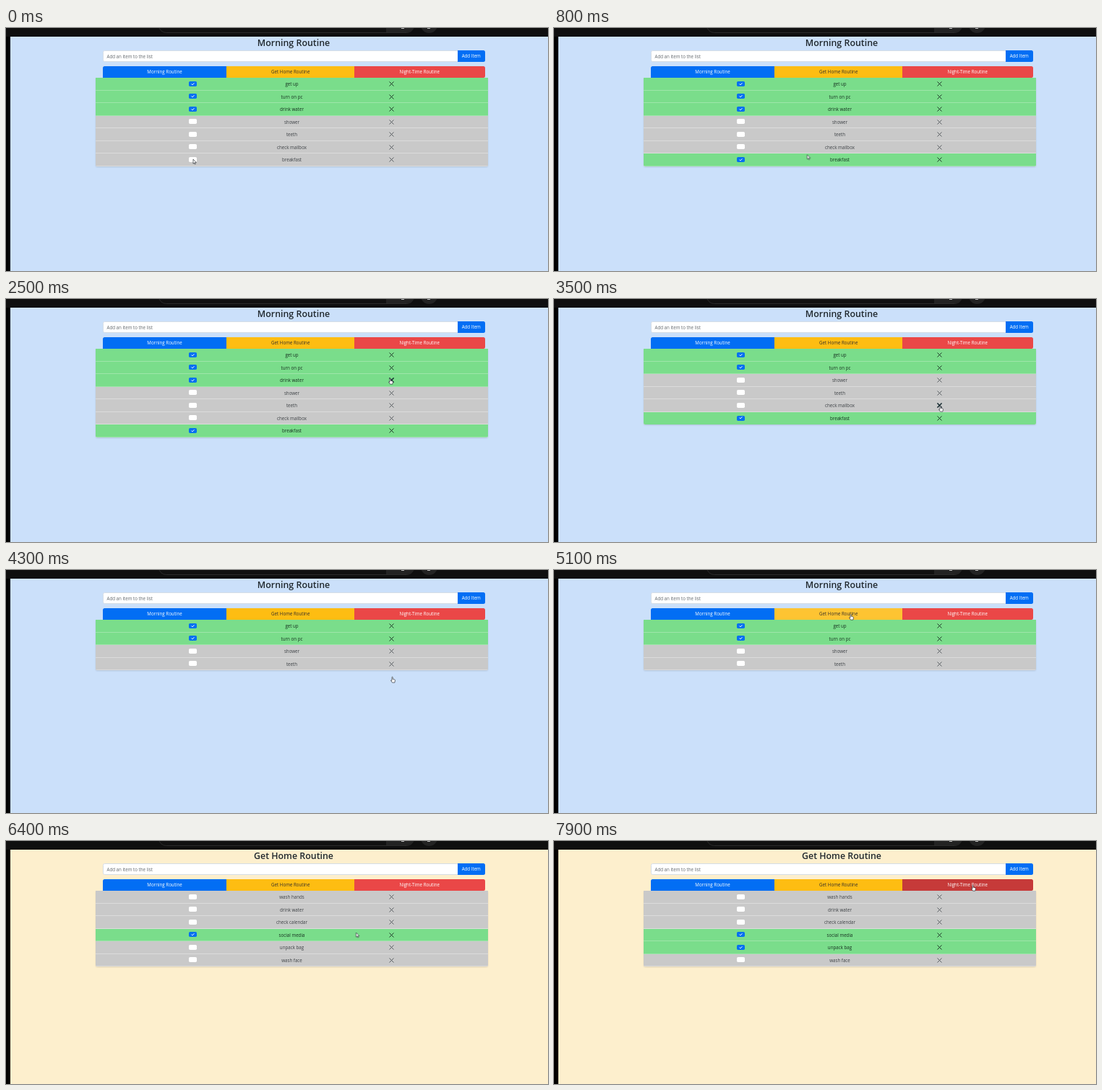
An HTML page that plays this animation: 750x337 px, repeating every 8 s.

```html
<!DOCTYPE html>
<html lang="en">
<head>
<meta charset="utf-8">
<title>Routine checklist</title>
<style>
  html, body { margin: 0; width: 100%; height: 100%; overflow: hidden; background: #000; }
  #stage {
    position: absolute; left: 0; top: 0; width: 750px; height: 337px; overflow: hidden;
    background: #000; color: #20282e;
    font: 6.2px/15px "Open Sans", "Noto Sans", sans-serif;
  }
  #stage div, #stage svg { position: absolute; box-sizing: border-box; }

  /* browser strip */
  .strip { left: 0; top: 0; width: 750px; height: 12px; background: #0f0f0f; overflow: hidden; }
  .search { left: 211px; top: -14px; width: 354px; height: 21px; border: 1px solid #2b2b2b; border-radius: 11px; background: #111; overflow: hidden; }
  .search div { right: 0; top: 0; width: 38px; height: 20px; background: #232323; }
  .round { left: 574px; top: -15px; width: 23px; height: 22px; border-radius: 50%; background: #232323; }
  .dash { top: -1px; width: 4px; height: 2px; background: #bbb; }

  /* pages */
  .page { left: 6px; top: 12px; width: 744px; height: 325px; }
  .morning { background: #cbe0fa; }
  .home { background: #fdefcd; animation: open 8s infinite; }
  .title { left: 0; top: 0; width: 784px; font-size: 12.4px; font-weight: 600; line-height: 17px; text-align: center; }
  .list { left: 118px; top: 57px; width: 543px; border-radius: 0 0 2.5px 2.5px; overflow: hidden; box-shadow: 0 1px 2px #0002; }
  #stage .row { position: relative; height: 17.5px; overflow: hidden; background: #c9c9c9; }
  .face { inset: 0; height: 17.5px; text-align: center; line-height: 18.4px; color: #3e4246; box-shadow: inset 0 -.7px #e3e3e3; }
  .on { background: #7add8b; color: #163020; box-shadow: inset 0 -.7px #a9e9b4; opacity: 0; }
  .done .on { opacity: 1; }
  .box { left: 129px; top: 4.5px; width: 11px; height: 7px; border-radius: 1.8px; background: #fff; }
  .on .box { background: #0570f0; }
  .box svg { left: 3px; top: 1px; width: 5px; height: 5px; }
  .face > svg { left: 406px; top: 5px; width: 7px; height: 7px; }
  svg { overflow: visible; fill: none; stroke: #5b6064; }
  .on svg { stroke: #20382a; }
  .on .box svg { stroke: #fff; }

  /* form and tabs */
  .field { left: 133.5px; top: 31px; width: 492px; height: 15.5px; padding-left: 5px; border-radius: 2.5px 0 0 2.5px; background: #fff; color: #63696e; border: .5px solid #d5dde6; }
  .btn { height: 15.5px; text-align: center; color: #fff; background: #026ef4; }
  .add { left: 625px; top: 31px; width: 37.5px; border-radius: 0 2.5px 2.5px 0; }
  .tab { top: 53px; height: 16px; line-height: 16px; }
  .t1 { left: 133.5px; width: 172px; border-radius: 2.5px 0 0 0; }
  .t2 { left: 305px; width: 177.5px; color: #33302a; background: #febd12; animation: hover-gold 8s infinite; }
  .t3 { left: 482px; width: 180.5px; border-radius: 0 2.5px 2.5px 0; background: #ea4747; animation: hover-red 8s infinite; }

  /* pointer */
  .pointer { left: 0; top: 0; width: 0; height: 0; animation: travel 8s ease-in-out infinite; }
  .pointer svg { left: 0; top: 0; width: 10px; height: 10px; }
  .pointer path { fill: #fff; stroke: #30343a; stroke-width: .7; stroke-linejoin: round; }
  .arrow { animation: arrow 8s step-end infinite; }
  .hand { animation: hand 8s step-end infinite; }
  #stage .hot { left: 530px; width: 7px; height: 7px; stroke: #152a30; stroke-width: 1.5; opacity: 0; }
  .hot.a { top: 161px; animation: hot-a 8s step-end infinite; }
  .hot.b { top: 109px; animation: hot-b 8s step-end infinite; }
  .hot.c { top: 144px; animation: hot-c 8s step-end infinite; }

  /* removed rows and ticked boxes */
  .gone-a { animation: gone-a 8s step-end infinite; }
  .gone-b { animation: gone-b 8s step-end infinite; }
  .gone-c { animation: gone-c 8s step-end infinite; }
  .tick-a .on { animation: tick-a 8s infinite; }
  .tick-b .on { animation: tick-b 8s infinite; }
  .tick-c .on { animation: tick-c 8s infinite; }

  @keyframes gone-a { 0% { height: 17.5px } 33.7%, 100% { height: 0 } }
  @keyframes gone-b { 0% { height: 17.5px } 46.2%, 100% { height: 0 } }
  @keyframes gone-c { 0% { height: 17.5px } 52.4%, 100% { height: 0 } }
  @keyframes tick-a { 0%, 2.4% { opacity: 0 } 3.2%, 100% { opacity: 1 } }
  @keyframes tick-b { 0%, 74.2% { opacity: 0 } 75%, 100% { opacity: 1 } }
  @keyframes tick-c { 0%, 87.8% { opacity: 0 } 88.6%, 100% { opacity: 1 } }
  @keyframes open { 0%, 65.6% { opacity: 0 } 65.7%, 100% { opacity: 1 } }
  @keyframes hover-gold { 0%, 60.5% { background: #febd12 } 62.3%, 68% { background: #fec432 } 69.8%, 100% { background: #febd12 } }
  @keyframes hover-red { 0%, 95.7% { background: #ea4747 } 97.5%, 100% { background: #c63a39 } }
  @keyframes hot-a { 0% { opacity: 0 } 16.5% { opacity: 1 } 23.5%, 100% { opacity: 0 } }
  @keyframes hot-b { 0% { opacity: 0 } 27% { opacity: 1 } 35.9%, 100% { opacity: 0 } }
  @keyframes hot-c { 0% { opacity: 0 } 41.7% { opacity: 1 } 52.4%, 100% { opacity: 0 } }
  @keyframes hand {
    0% { opacity: 0 } 16.5% { opacity: 1 } 23.5% { opacity: 0 } 27% { opacity: 1 } 35.9% { opacity: 0 }
    41.7% { opacity: 1 } 54.9% { opacity: 0 } 60.5% { opacity: 1 } 68% { opacity: 0 } 95.7%, 100% { opacity: 1 }
  }
  @keyframes arrow {
    0% { opacity: 1 } 16.5% { opacity: 0 } 23.5% { opacity: 1 } 27% { opacity: 0 } 35.9% { opacity: 1 }
    41.7% { opacity: 0 } 54.9% { opacity: 1 } 60.5% { opacity: 0 } 68% { opacity: 1 } 95.7%, 100% { opacity: 0 }
  }
  @keyframes travel {
    0%, 5% { transform: translate(259px, 182px) }
    17.5%, 22.5% { transform: translate(533px, 163px) }
    27.5%, 35% { transform: translate(531px, 110px) }
    42.5%, 53.75% { transform: translate(534px, 148px) }
    62.5%, 66.25% { transform: translate(410px, 61px) }
    73.75%, 75.6% { transform: translate(259px, 128px) }
    80% { transform: translate(484.5px, 127px) }
    87.5%, 89.4% { transform: translate(259px, 145px) }
    97.5%, 100% { transform: translate(579px, 61px) }
  }
</style>
</head>
<body>
<div id="stage">
  <div class="strip">
    <div class="search"><div></div></div>
    <div class="round"></div>
    <div class="dash" style="left:547px"></div>
    <div class="dash" style="left:583px"></div>
  </div>
  <div class="page morning"><div class="title">Morning Routine</div><div class="list" id="morning"></div></div>
  <div class="page home"><div class="title">Get Home Routine</div><div class="list" id="home"></div></div>
  <div class="field">Add an item to the list</div>
  <div class="btn add">Add Item</div>
  <div class="btn tab t1">Morning Routine</div>
  <div class="btn tab t2">Get Home Routine</div>
  <div class="btn tab t3">Night-Time Routine</div>
  <svg class="hot a" viewBox="0 0 7 7"><path d="M.5 .5l6 6m0-6l-6 6"/></svg>
  <svg class="hot b" viewBox="0 0 7 7"><path d="M.5 .5l6 6m0-6l-6 6"/></svg>
  <svg class="hot c" viewBox="0 0 7 7"><path d="M.5 .5l6 6m0-6l-6 6"/></svg>
  <div class="pointer">
    <svg class="arrow" viewBox="0 0 10 10"><path d="M0 0v6.2l1.4-1.2.9 2 1-.4-.9-2h1.9z"/></svg>
    <svg class="hand" viewBox="0 0 10 10"><path d="M0 .6q.6-.9 1.2 0v2.6l2.6.7q.7.3.6 1.2l-.5 3H.5l-2-3q.3-.9 1.5.2z"/></svg>
  </div>
</div>
<script>
  const cross = '<svg viewBox="0 0 7 7"><path d="M.5 .5l6 6m0-6l-6 6"/></svg>';
  const tick = '<svg viewBox="0 0 5 5"><path d="M.6 2.6l1.3 1.3 2.5-2.6"/></svg>';

  const face = (text, on) =>
    `<div class="face ${on ? 'on' : ''}"><div class="box">${on ? tick : ''}</div>${text}${cross}</div>`;

  function fill(id, items) {
    document.getElementById(id).innerHTML = items
      .map(([text, state = '']) => `<div class="row ${state}">${face(text, false)}${face(text, true)}</div>`)
      .join('');
  }

  fill('morning', [
    ['get up', 'done'], ['turn on pc', 'done'], ['drink water', 'done gone-a'],
    ['shower'], ['teeth'], ['check mailbox', 'gone-b'], ['breakfast', 'tick-a gone-c'],
  ]);
  fill('home', [
    ['wash hands'], ['drink water'], ['check calendar'],
    ['social media', 'tick-b'], ['unpack bag', 'tick-c'], ['wash face'],
  ]);
</script>
</body>
</html>
```
